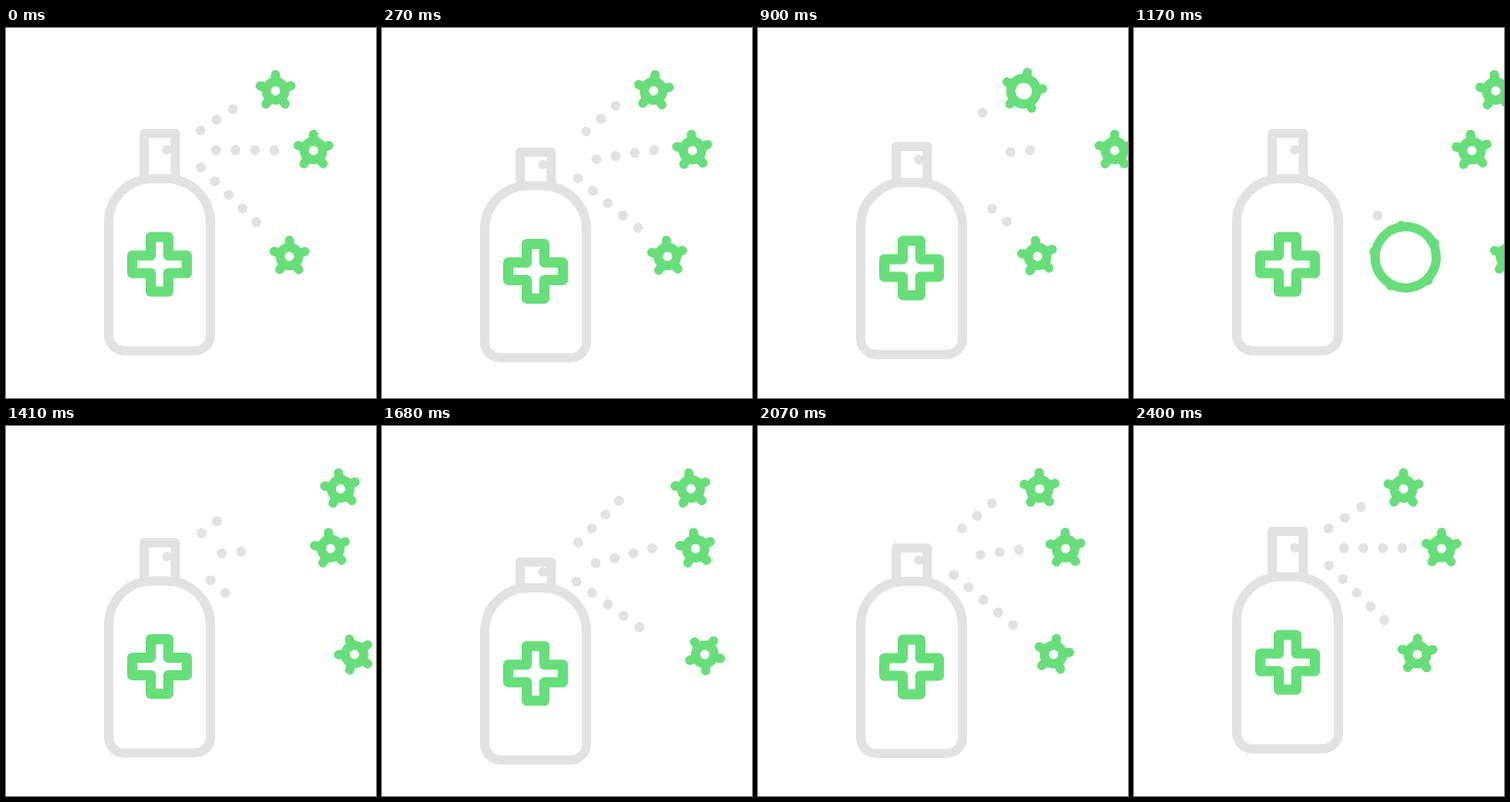
An HTML page that plays this animation: 400x400 px, repeating every 2430 ms.

```html
<!DOCTYPE html>
<html lang="en">
<head>
<meta charset="utf-8">
<title>Disinfectant spray</title>
<style>
  html, body { margin: 0; width: 100%; height: 100%; overflow: hidden; background: #fff; }
  svg { display: block; width: 100%; height: 100%; }
  .line { fill: none; stroke-width: 10; stroke-linejoin: round; }
  .grey { stroke: #e2e2e2; }
  .green { stroke: #68de7b; }
  .knob { stroke-linecap: round; }
  .cross { stroke-width: 11; }
</style>
</head>
<body>
<svg viewBox="0 0 400 400">
  <path id="cap" class="line grey"/>
  <circle id="nozzle" cx="174" r="5.3" fill="#e2e2e2"/>
  <g id="bottle">
    <path class="line grey" d="M111 210A47 47 0 0 1 158 163H174A47 47 0 0 1 221 210V332A17 17 0 0 1 204 349H128A17 17 0 0 1 111 332Z"/>
    <path class="line green cross" d="M156.500 226V246H136.500V265H156.500V285H175.500V265H195.500V246H175.500V226Z"/>
  </g>
  <g id="spray" fill="#e2e2e2"></g>
  <g id="germs"></g>
</svg>
<script>
const LOOP = 2430, LAST = 2400, STEP = 30, PRESS = 1215;
const SPRAY_ON = 1230, SPRAY_FULL = 1680, SPRAY_OFF = 2970;
const GAP = 21, BURST = 290;
const el = id => document.getElementById(id);

const clamp = v => Math.max(0, Math.min(1, v));
const ease = v => 0.5 - 0.5 * Math.cos(Math.PI * clamp(v));

// rises from 0 to 1 until `up`, falls back between `hold` and `end`
const pulse = (t, up, hold, end) => t < hold ? ease(t / up) : 1 - ease((t - hold) / (end - hold));

// tip: far end of the jet; near: where drops appear; sway: share of the nozzle's drop
const jets = [
  { tip: [257, 80], near: [210, 111], sway: 0.65, speed: 93 },
  { tip: [293, 132], near: [230, 132], sway: 0.63, speed: 79 },
  { tip: [279, 218], near: [210, 150], sway: 0.69, speed: 96 }
];

// arrive: time the germ comes to rest at x; pace: approach speed; burst: time the ring opens
const germs = [
  { x: 290.5, y: 68, arrive: 2480, pace: 11.5, burst: 3235, swing: 8, roll: 0, lean: 11 },
  { x: 332.5, y: 132.5, arrive: 2000, pace: 9.4, burst: 2892, swing: 8, roll: 0, lean: -8 },
  { x: 305.5, y: 247, arrive: 2480, pace: 11.5, burst: 3320, swing: 0, roll: 0.75, lean: -8 }
];

// distance a drop has flown since the jet was first full, slowly speeding up
function flown(jet, t, len) {
  const s = (t - SPRAY_FULL) / 1000;
  return s < 0 ? len * (t - SPRAY_FULL) / (SPRAY_FULL - SPRAY_ON) : s * (jet.speed + 8 * s);
}

function drops(jet, t, drop) {
  const [ex, ey] = jet.tip;
  const dx = jet.near[0] - ex, dy = jet.near[1] + jet.sway * drop - ey;
  const len = Math.hypot(dx, dy), moved = flown(jet, t, len);
  const count = Math.ceil((flown(jet, SPRAY_OFF, len) + len) / GAP);
  let out = "";
  for (let k = 0; k < count; k++) {
    const d = GAP * k - moved + 1;
    const x = ex + dx / len * d, y = ey + dy / len * d;
    if (d > -2 && d < len + 5) out += `<circle cx="${x.toFixed(2)}" cy="${y.toFixed(2)}" r="5.4"/>`;
  }
  return out;
}

function germ(g, t) {
  if (t >= g.burst + BURST) return "";
  const away = Math.pow(g.pace * Math.max(0, g.arrive - t) / 1000, 1.7);
  const s = Math.max(0, t - LAST) / 1000;
  const x = g.x + away + 24 * s * (0.75 - s);
  if (x > 425) return "";

  const swing = -g.swing * Math.sin(Math.PI * Math.min(1, (t - 900) / 1250));
  const turn = swing + g.roll * away + g.lean * clamp(s / 0.57);
  const open = clamp((t - g.burst) / BURST);
  const r = 10 + 28 * Math.pow(open, 1.3);
  const reach = 17.5 + (r - 10) * 0.75;
  let knobs = "";
  for (let k = 0; k < 5; k++) {
    knobs += `<path class="line green knob" transform="rotate(${72 * k})" d="M0 ${-r}V${-reach}"/>`;
  }
  return `<g transform="translate(${x.toFixed(2)} ${g.y + open}) rotate(${turn.toFixed(2)})">` +
    `<circle class="line green" r="${r}"/>${knobs}</g>`;
}

function draw(ms) {
  const t = Math.min(Math.floor(ms % LOOP / STEP) * STEP, LAST);
  const p = t % PRESS;
  const body = 12 * pulse(p, 470, 470, 1170);
  const squash = 21 * pulse(p, 470, 600, 1190);
  const drop = body + squash * 0.667;

  el("bottle").setAttribute("transform", `translate(0 ${body})`);
  el("cap").setAttribute("d", `M149.500 ${163 + body}V${114 + body + squash}H183V${163 + body}`);
  el("nozzle").setAttribute("cy", 131.5 + drop);

  const late = t < SPRAY_ON ? t + LAST : t;
  el("spray").innerHTML = jets.map(j => drops(j, late, drop)).join("");
  // the germ still arriving and the one left from the previous loop
  el("germs").innerHTML = germs.map(g => germ(g, t) + germ(g, t + LAST)).join("");
}

function tick() {
  draw(performance.now());
  requestAnimationFrame(tick);
}
tick();
</script>
</body>
</html>
```
